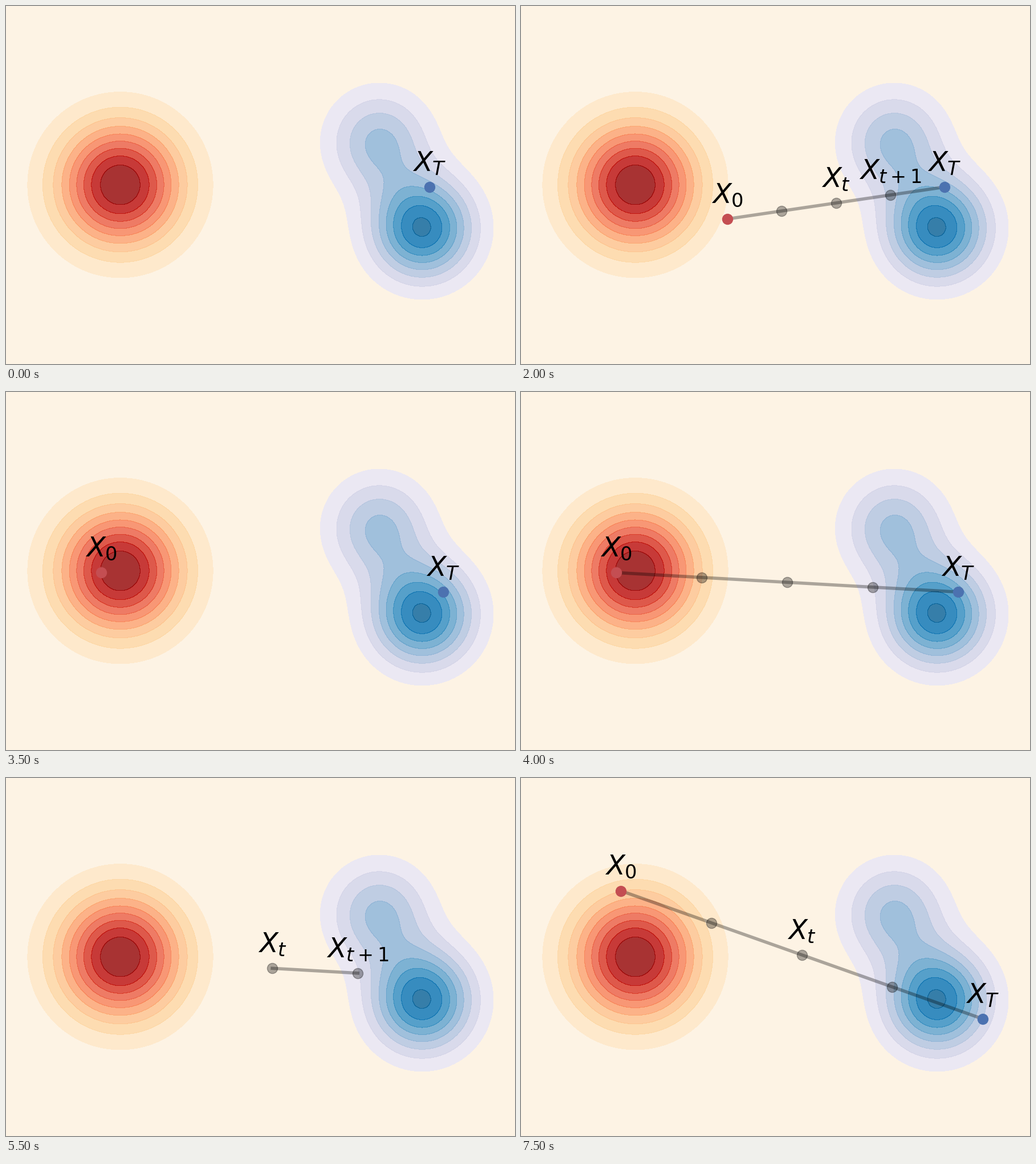
A matplotlib script that plays this animation: 893x627 px, repeating every 8 s.

```python
import numpy as np
import matplotlib.pyplot as plt
from matplotlib.animation import ArtistAnimation

W, H, DPI = 893, 627, 128
PX = 72 / DPI  # points per pixel
RED, BLUE, GREY_ALPHA = "#c44e52", "#4c72b0", 0.32
LEVELS = np.arange(1, 11) / 10

plt.rcParams["font.family"] = "DejaVu Sans"
plt.rcParams["mathtext.fontset"] = "dejavusans"

fig = plt.figure(figsize=(W / DPI, H / DPI), dpi=DPI, facecolor="#fdf3e4")
ax = fig.add_axes([0, 0, 1, 1])
ax.set_xlim(0, W)
ax.set_ylim(H, 0)
ax.axis("off")

gx, gy = np.meshgrid(np.arange(0, W + 1, 2), np.arange(0, H + 2, 2))


def bump(cx, cy, k, height=1.0):
    return height * np.exp(-((gx - cx) ** 2 + (gy - cy) ** 2) / k)


def density(z, cmap):
    # White base, so the translucent bands do not pick up the cream.
    ax.contourf(gx, gy, z, levels=LEVELS[[0, -1]], colors="white", zorder=0)
    ax.contourf(gx, gy, z, levels=LEVELS, cmap=cmap,
                vmin=0, vmax=1, alpha=0.8, zorder=1)


density(bump(200.5, 313.2, 11480), "OrRd")
density(bump(730.2, 389, 7400, 0.818) + bump(654.8, 238.3, 7400, 0.422), "PuBu")


def dots(pts, color, alpha=1.0, z=4):
    return ax.plot(pts[:, 0], pts[:, 1], "o", color=color, alpha=alpha,
                   ms=18 * PX, mew=1.4 * PX, zorder=z)


def path(pts):
    return ax.plot(pts[:, 0], pts[:, 1], color="black", alpha=GREY_ALPHA,
                   lw=5.6 * PX, zorder=2)


def label(p, sub):
    return [ax.text(p[0], p[1] - 28, f"$X_{{{sub}}}$", fontsize=48 * PX,
                    ha="center", va="baseline", zorder=5)]


def trial(start, end, steps=6):
    """Steps: end, start, bridge, X_t, X_t+1, then the single step alone."""
    pts = np.linspace(start, end, 5)
    makers = [
        lambda: dots(pts[4:], BLUE) + label(pts[4], "T"),
        lambda: dots(pts[:1], RED) + label(pts[0], "0"),
        lambda: path(pts) + dots(pts[1:4], "black", GREY_ALPHA, 3),
        lambda: label(pts[2], "t"),
        lambda: label(pts[3], "t+1"),
    ]
    parts = [make() for make in makers[:steps]]
    frames = [sum(parts[:n + 1], []) for n in range(len(parts))]
    if steps == 6:
        step = path(pts[2:4]) + dots(pts[2:4], "black", GREY_ALPHA, 3)
        frames.append(step + parts[3] + parts[4])
    return frames


frames = (trial((362, 373), (743.3, 317))
          + trial((167, 316.3), (767.3, 350.3))
          + trial((175, 197.5), (810.2, 422), steps=4))

anim = ArtistAnimation(fig, frames, interval=500, repeat=True, repeat_delay=0)
plt.show()
```
